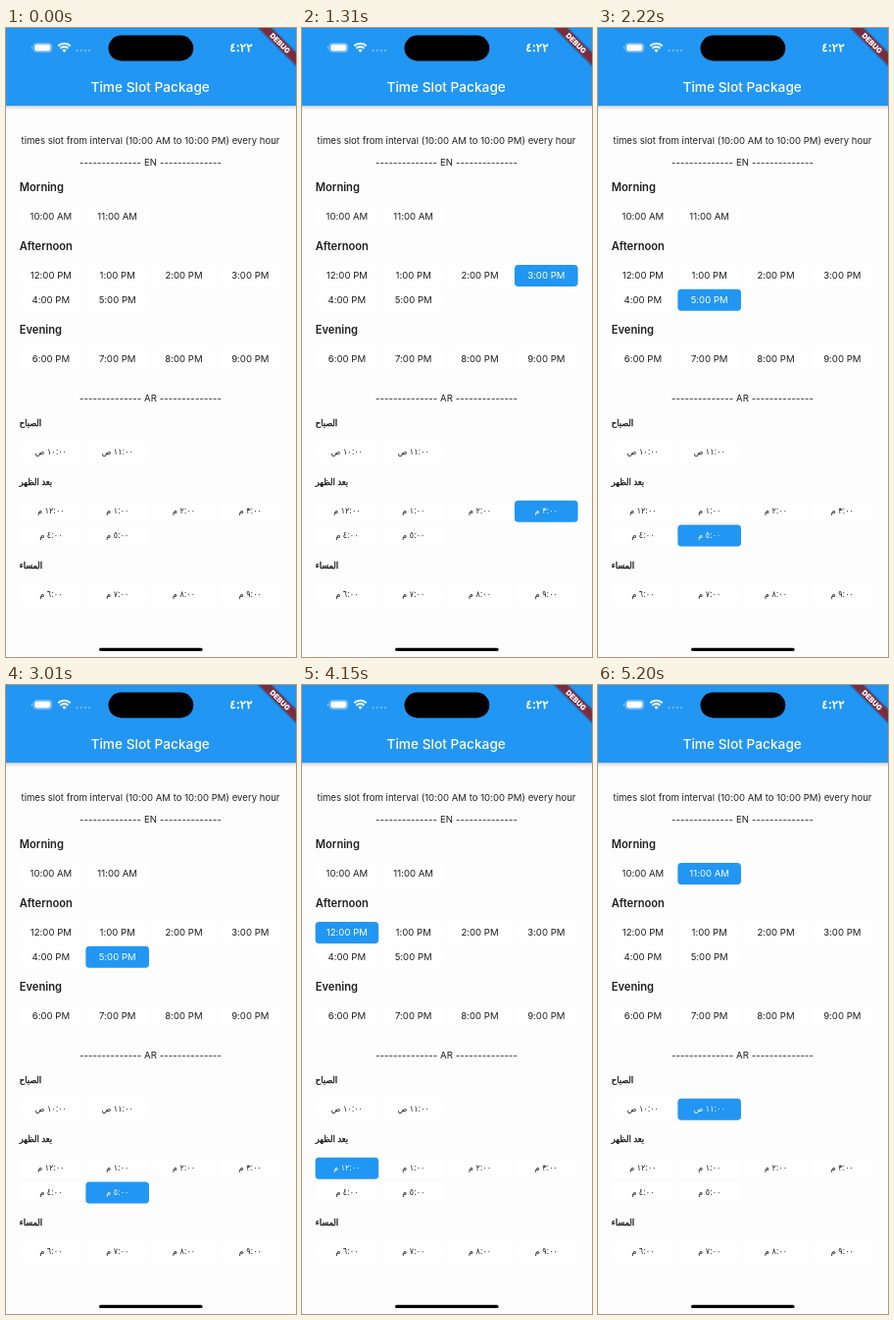
An HTML page for the animation above (5350 ms loop, 296x640 px).

```html
<!DOCTYPE html>
<html lang="en">
<head>
<meta charset="utf-8">
<title>Time Slot Package</title>
<style>
  html, body { margin: 0; width: 100%; height: 100%; overflow: hidden; background: #fdfdfd; }
  svg { display: block; width: 296px; height: 640px; font-family: Inter, Roboto, sans-serif; font-feature-settings: "calt" 0; }
  text { fill: #202020; white-space: pre; }
  .mid { text-anchor: middle; }
  .title { font-size: 13.7px; font-weight: 500; fill: #fff; }
  .body { font-size: 9.6px; }
  .rule { letter-spacing: .1px; }
  .head { font-size: 11.15px; font-weight: 600; }
  .ar { font-family: "DejaVu Sans", sans-serif; font-size: 8.9px; font-stretch: condensed; }
  .head.ar { font-size: 9.2px; font-weight: 400; stroke: #202020; stroke-width: .4; }
  .clock { font-family: "DejaVu Sans", sans-serif; font-size: 12px; fill: #fff; stroke: #fff; stroke-width: .5; }
  .debug { font-size: 7.4px; font-weight: 900; fill: #fff; }
  .slot rect { fill: #fefefe; }
  .slot.on rect { fill: #2196f3; }
  .slot.on text { fill: #fff; }
</style>
</head>
<body>
<svg viewBox="0 0 296 640">
  <defs>
    <linearGradient id="shade" x2="0" y2="1">
      <stop offset="0" stop-opacity=".22"/>
      <stop offset=".4" stop-opacity=".08"/>
      <stop offset="1" stop-opacity="0"/>
    </linearGradient>
    <filter id="blur" x="-50%" y="-100%" width="200%" height="300%"><feGaussianBlur stdDeviation="1.2"/></filter>
  </defs>
  <rect width="296" height="640" fill="#fdfdfd"/>
  <rect y="79" width="296" height="5" fill="url(#shade)"/>
  <rect width="296" height="79" fill="#2196f3"/>

  <rect x="104.5" y="7.6" width="86.8" height="25.8" rx="12.9"/>
  <g fill="#fff">
    <rect x="28" y="15.4" width="18.8" height="9.2" rx="2.8" fill="none" stroke="#fff" stroke-opacity=".45" stroke-width=".8"/>
    <rect x="29.2" y="16.6" width="16.4" height="6.8" rx="1.8"/>
    <path d="M27 18.5v3q-1.2-.4-1.2-1.5t1.2-1.5" opacity=".5"/>
    <path d="M57.4 22.6a3 3 0 0 1 4.2 0l-2.1 2.3z"/>
    <g fill="none" stroke="#fff" stroke-width="2">
      <path d="M53.3 18.2a8.8 8.8 0 0 1 12.4 0"/>
      <path d="M55.5 20.8a5.6 5.6 0 0 1 8 0"/>
    </g>
    <g opacity=".32">
      <circle cx="72.5" cy="23" r="1.2"/><circle cx="76.7" cy="23" r="1.2"/>
      <circle cx="80.9" cy="23" r="1.2"/><circle cx="85.1" cy="23" r="1.2"/>
    </g>
  </g>
  <text class="clock mid" x="240" y="24">٤:٢٢</text>
  <text class="title mid" x="147.2" y="64.6">Time Slot Package</text>

  <g transform="translate(296 0) rotate(45)">
    <rect x="-30.4" y="17.8" width="60.8" height="9.1" opacity=".5" filter="url(#blur)"/>
    <rect x="-30.4" y="17.8" width="60.8" height="9.1" fill="#b71c1c" fill-opacity=".63"/>
    <text class="debug mid" x="-.6" y="25">DEBUG</text>
  </g>

  <g id="page"></g>
  <rect x="95" y="630.7" width="105.6" height="3.4" rx="1.7"/>
</svg>
<script>
const LOOP = 5350;
// [start in ms, selected hour]
const steps = [[0, null], [1310, 15], [2110, 13], [2220, 17], [3120, 12], [4260, 13], [5200, 11]];
const sections = [
  { en: "Morning", ar: "الصباح", y: 162, from: 10, to: 11 },
  { en: "Afternoon", ar: "بعد الظهر", y: 222, from: 12, to: 17 },
  { en: "Evening", ar: "المساء", y: 306.8, from: 18, to: 21 }
];
const AR_SHIFT = 239.8;
const page = document.getElementById("page");
const slots = [];

function add(parent, tag, attrs, text) {
  const el = document.createElementNS("http://www.w3.org/2000/svg", tag);
  for (const key in attrs) el.setAttribute(key, attrs[key]);
  if (text) el.textContent = text;
  return parent.appendChild(el);
}

const arabic = n => String(n).replace(/\d/g, d => String.fromCharCode(0x660 + +d));

function label(hour, ar) {
  const h = (hour + 11) % 12 + 1;
  if (ar) return arabic(h + ":00") + (hour < 12 ? " ص" : " م");
  return h + ":00 " + (hour < 12 ? "AM" : "PM");
}

function addSlot(hour, x, y, ar) {
  const el = add(page, "g", { class: "slot" });
  add(el, "rect", { x, y: y - 10.8, width: 64.6, height: 22, rx: 3.8 });
  add(el, "text", { class: "mid " + (ar ? "ar" : "body"), x: x + 32.3, y: y + (ar ? 2.8 : 3.4) }, label(hour, ar));
  slots.push({ el, hour });
}

function addList(ar) {
  const dy = ar ? AR_SHIFT : 0;
  const rule = "-".repeat(14);
  add(page, "text", { class: "body rule mid", x: 147.5, y: 140 + dy }, `${rule} ${ar ? "AR" : "EN"} ${rule}`);
  for (const s of sections) {
    add(page, "text", { class: ar ? "head ar" : "head", x: 13.8, y: s.y + (ar ? 3.2 : 4) + dy }, ar ? s.ar : s.en);
    for (let h = s.from; h <= s.to; h++) {
      const i = h - s.from;
      addSlot(h, 13.6 + 67.8 * (i % 4), s.y + 29.8 + 24.8 * Math.floor(i / 4) + dy, ar);
    }
  }
}

add(page, "text", { class: "body mid", x: 147.5, y: 117.5 }, "times slot from interval (10:00 AM to 10:00 PM) every hour");
addList(false);
addList(true);

function draw() {
  const t = performance.now() % LOOP;
  const picked = steps.filter(s => s[0] <= t).pop()[1];
  for (const s of slots) s.el.classList.toggle("on", s.hour === picked);
  requestAnimationFrame(draw);
}
draw();
</script>
</body>
</html>
```
